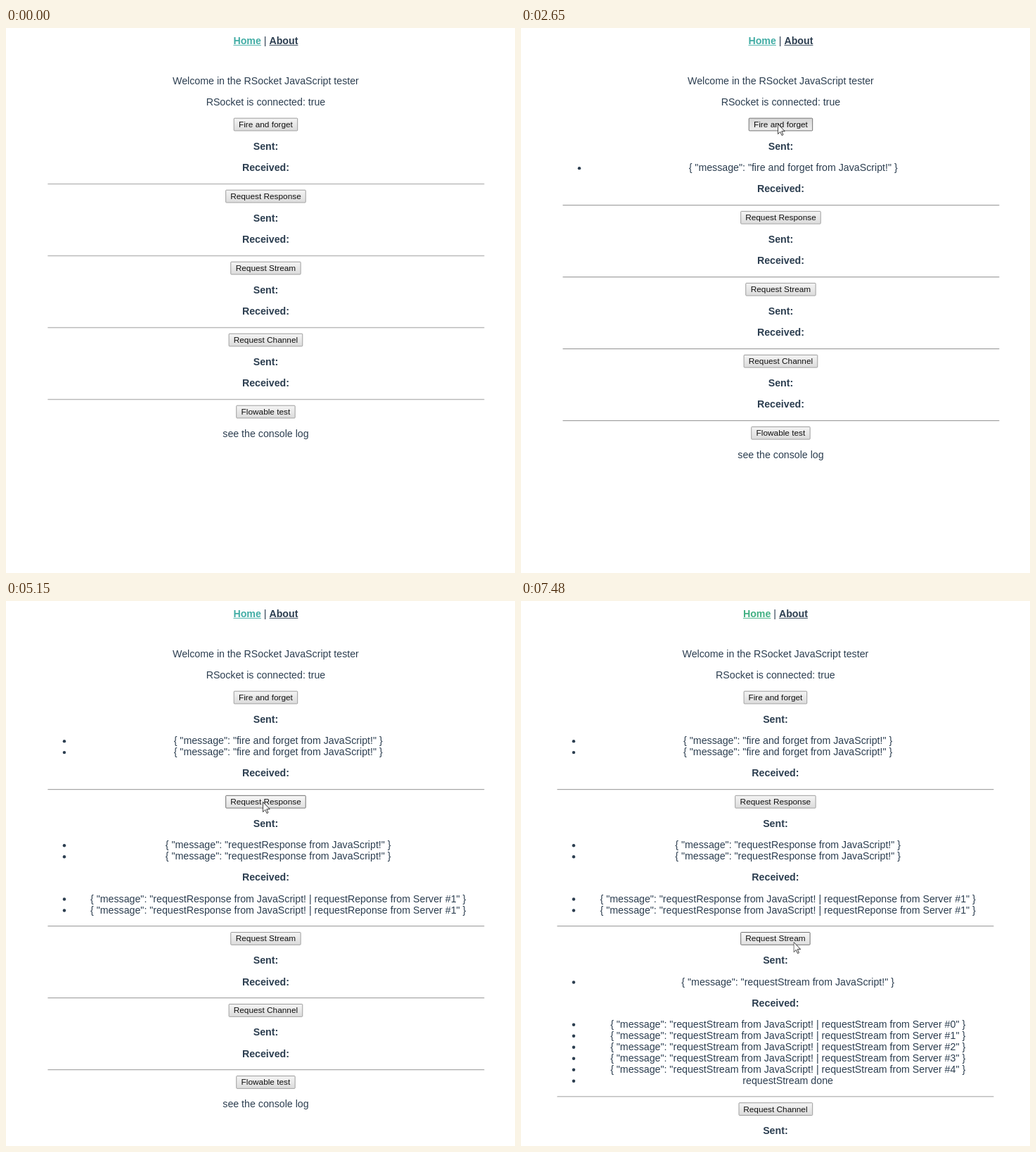
These frames come from a looping animation (724x774 px, 8000 ms). An HTML page:

```html
<!DOCTYPE html>
<html lang="en">
<head>
<meta charset="utf-8">
<title>RSocket JavaScript tester</title>
<style>
  html, body { margin: 0; width: 100%; height: 100%; overflow: hidden; background: #fff; }
  #stage { position: relative; width: 100%; height: 100%; overflow: hidden; contain: strict; }
  #page {
    position: absolute; top: 0; left: 0; box-sizing: border-box; padding-top: 12px;
    transform: scale(.887); transform-origin: 0 0;
    font: 16px/18px Arial, "Liberation Sans", sans-serif;
    color: #2c3e50; text-align: center;
  }
  nav { padding-bottom: 30px; }
  nav b { text-decoration: underline; }
  main { width: 700px; margin: 0 auto; }
  p { margin: 16px 0; }
  ul { margin: 16px 0; padding: 0 0 0 40px; list-style: none; }
  li { position: relative; white-space: nowrap; }
  li[hidden] { display: none; }
  li::before {
    content: ""; position: absolute; left: -16px; top: 7px;
    width: 5px; height: 5px; border-radius: 50%; background: #2c3e50;
  }
  hr { margin: 8px 0; border: 0; border-top: 1px solid #8e8e8e; border-bottom: 1px solid #e8e8e8; }
  .row { height: 21px; }
  .button {
    display: inline-block; vertical-align: top; box-sizing: border-box; height: 21px;
    padding: 2px 7px; border: 1px solid #8e8e8e; border-radius: 1.5px;
    background: linear-gradient(#f4f4f4, #dcdcdc);
    font-size: 13.333px; line-height: 15px; color: #111;
  }
  .button.hover { border-color: #5c5c5c; background: linear-gradient(#f7f7f7, #e0e0e0); }
  .button.active { border-color: #5c5c5c; background: linear-gradient(#d8d8d8, #ededed); }
  #cursor { position: absolute; top: 0; left: 0; width: 10.65px; height: 16.9px; }
</style>
</head>
<body>
<div id="stage">
  <div id="page">
    <nav><b id="home">Home</b> | <b>About</b></nav>
    <main id="main">
      <p>Welcome in the RSocket JavaScript tester</p>
      <p>RSocket is connected: true</p>
    </main>
  </div>
  <svg id="cursor" viewBox="0 0 12 19">
    <path d="M.5 .5V16.5L4.2 12.9 6.8 18.6 9 17.6 6.5 12H11.5Z" fill="#fff" stroke="#222"/>
  </svg>
</div>
<script>
const LOOP = 8000;
const STREAM_AT = 7330;
const byId = id => document.getElementById(id);
const message = text => `{ "message": "${text}" }`;
const fromClient = name => `${name} from JavaScript!`;

const fire = message(fromClient('fire and forget'));
const request = message(fromClient('requestResponse'));
const response = message(fromClient('requestResponse') + ' | requestReponse from Server #1');
const streamed = [0, 1, 2, 3, 4].map(n =>
  [STREAM_AT, message(`${fromClient('requestStream')} | requestStream from Server #${n}`)]);

// Each list entry is [time it appears, text].
const sections = [
  { title: 'Fire and forget', sent: [[1410, fire], [2750, fire]], received: [] },
  { title: 'Request Response',
    sent: [[4210, request], [5150, request]],
    received: [[4210, response], [5150, response]] },
  { title: 'Request Stream',
    sent: [[STREAM_AT, message(fromClient('requestStream'))]],
    received: [...streamed, [STREAM_AT, 'requestStream done']] },
  { title: 'Request Channel', sent: [], received: [] }
];

const presses = [[1250, 1410], [2590, 2750], [4060, 4210], [5090, 5150], [7180, 7330]];

const linear = u => u;
const easeOut = u => 1 - (1 - u) ** 2;
const easeInOut = u => u * u * (3 - 2 * u);

// Cursor moves: first step, last step, step count, end point, easing.
const start = [621, 822];
const moves = [
  [240, 1030, 11, 363, 132, easeOut],
  [1960, 2040, 2, 363, 142, linear],
  [2190, 2290, 2, 365, 136, linear],
  [3140, 3430, 5, 365, 291, easeInOut],
  [3830, 3830, 1, 365, 285.5, linear],
  [4760, 4760, 1, 365, 285, linear],
  [5460, 6013, 8, 380, 503, easeInOut],
  [6092, 6250, 3, 381, 483, easeOut],
  [6410, 6410, 1, 381, 480, linear],
  [6610, 6610, 1, 380, 480, linear],
  [6940, 7020, 2, 381, 474, linear],
  [7405, 7480, 2, 387.5, 484, linear]
];

const listHtml = items =>
  `<ul>${items.map(([at, text]) => `<li data-at="${at}">${text}</li>`).join('')}</ul>`;
const buttonHtml = title => `<div class="row"><span class="button">${title}</span></div>`;

byId('main').innerHTML += sections.map(({ title, sent, received }) =>
  `${buttonHtml(title)}<p><b>Sent:</b></p>${listHtml(sent)}<p><b>Received:</b></p>${listHtml(received)}<hr>`
).join('') + buttonHtml('Flowable test') + '<p>see the console log</p>';

const items = [...document.querySelectorAll('li')];
const buttons = [...document.querySelectorAll('.button')];

function cursorAt(t) {
  let [x, y] = start;
  for (const [from, to, steps, endX, endY, ease] of moves) {
    if (t < from) break;
    const interval = (to - from) / (steps - 1) || 1;
    const step = Math.min(steps, Math.floor((t - from) / interval + 1e-6) + 1);
    const progress = ease(step / steps);
    x += (endX - x) * progress;
    y += (endY - y) * progress;
  }
  return [x, y];
}

function render(t) {
  // The overflowing stream takes a scrollbar's width off the page.
  const overflowing = t >= STREAM_AT;
  byId('page').style.width = overflowing ? '816px' : '833px';
  byId('home').style.color = overflowing ? '#42b083' : '#42ada5';
  for (const item of items) item.hidden = t < item.dataset.at;

  const [x, y] = cursorAt(t);
  byId('cursor').style.transform = `translate(${x}px, ${y}px)`;
  byId('cursor').style.visibility = t < moves[0][0] ? 'hidden' : 'visible';

  const pressed = presses.some(([down, up]) => t >= down && t < up);
  for (const button of buttons) {
    const box = button.getBoundingClientRect();
    const hover = x >= box.left && x < box.right && y >= box.top && y < box.bottom;
    button.classList.toggle('hover', hover);
    button.classList.toggle('active', hover && pressed);
  }
}

const origin = performance.now();
function tick() {
  render((performance.now() - origin) % LOOP);
  requestAnimationFrame(tick);
}
tick();
</script>
</body>
</html>
```
